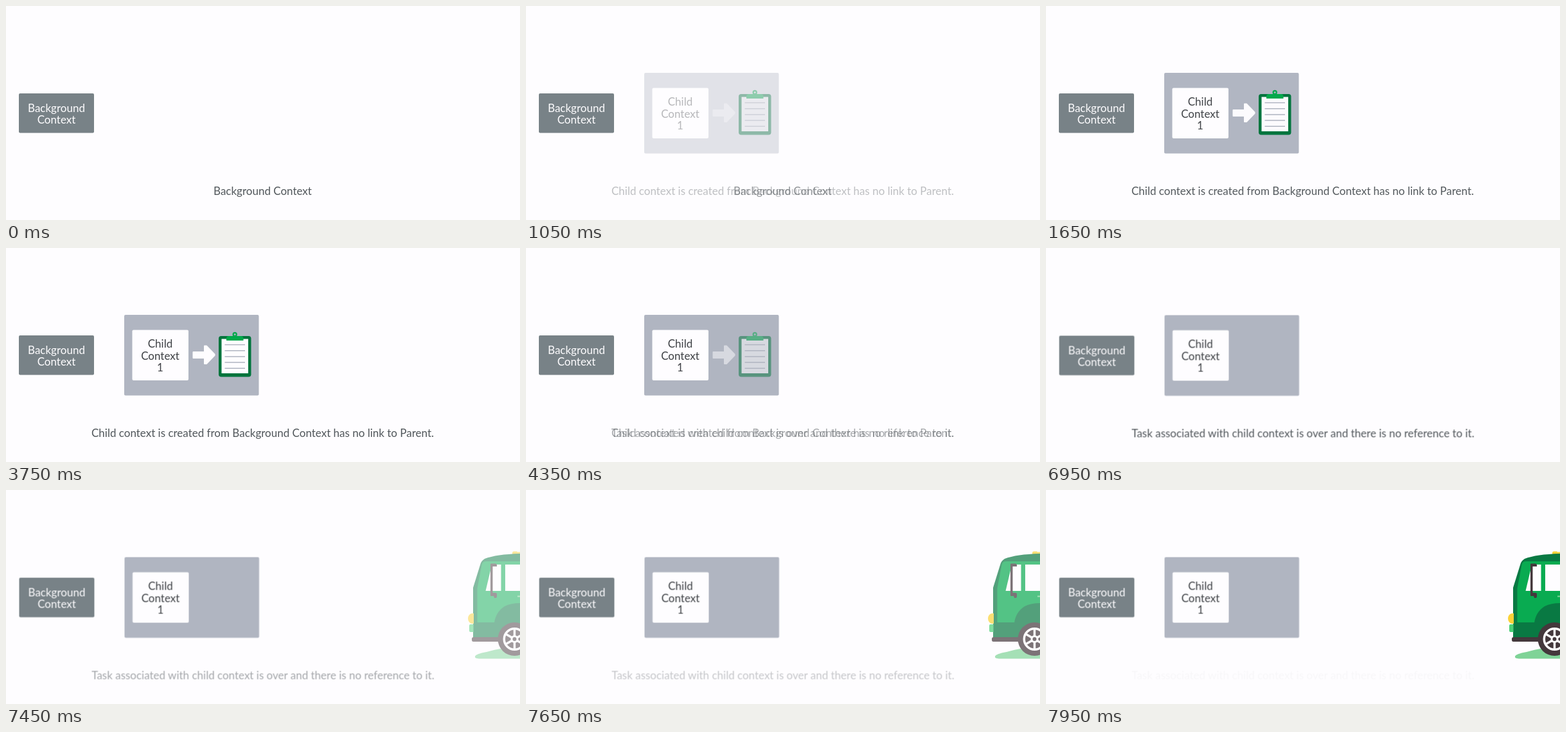
These frames come from a looping animation (800 px wide and 333 px high, 8000 ms). An HTML page:

```html
<!DOCTYPE html>
<html lang="en">
<head>
<meta charset="utf-8">
<title>Child context lifecycle</title>
<style>
  html, body { margin: 0; width: 100%; height: 100%; overflow: hidden; background: #fefdff; }
  svg { display: block; width: 100vw; height: 100vh; }
  text { font: 17px Lato, "Open Sans", sans-serif; text-anchor: middle; }
  .caption { fill: #50565a; }
  .label { fill: #3d4044; }
  .paper { fill: #fefdff; }
  .leaf { fill: #00a84a; }
  .pine { fill: #00743c; }
  .coal { fill: #3d3135; }
  .sun { fill: #fbd130; }
</style>
</head>
<body>
<svg viewBox="0 0 800 333">
  <g id="slide">
    <rect x="20" y="136" width="117" height="61.5" rx="2" fill="#788287"/>
    <g class="paper">
      <text x="78.5" y="164.5">Background</text>
      <text x="78.5" y="183">Context</text>
    </g>

    <g id="child">
      <rect x="184" y="104" width="209.5" height="125.5" rx="2" fill="#b0b5c1"/>
      <rect class="paper" x="196.5" y="127.5" width="87.5" height="78.5" rx="2"/>
      <g class="label">
        <text x="240" y="155">Child</text>
        <text x="240" y="173.5">Context</text>
        <text x="240" y="192">1</text>
      </g>
    </g>

    <g id="task">
      <path class="paper" stroke="#fefdff" stroke-width="2" stroke-linejoin="round"
        d="M291.5 162H309V152.5H312L324.5 165.5V167L312 180H309V171H291.5Z"/>
      <rect class="pine" x="331" y="137" width="50.5" height="63.5" rx="4"/>
      <rect class="paper" x="335.5" y="141.5" width="41.5" height="53.5"/>
      <path class="leaf" d="M343 144V141Q343 137 347 137H365.500Q369.500 137 369.500 141V144Z"/>
      <circle cx="356.200" cy="134.500" r="2.600" fill="none" stroke="#00a84a" stroke-width="2.200"/>
      <path d="M340.500 150.500h31.500m-31.500 9.200h31.500m-31.500 9.200h31.500m-31.500 9.200h31.500m-31.500 9.200h31.500"
        stroke="#b0b5c1" stroke-width="1.500"/>
    </g>

    <g class="caption">
      <text id="intro" x="399.5" y="293.500">Background Context</text>
      <text id="created" x="399.5" y="293.500">Child context is created from Background Context has no link to Parent.</text>
      <text id="over" x="399.5" y="293.500">Task associated with child context is over and there is no reference to it.</text>
    </g>
  </g>

  <g id="van">
    <path fill="#7ad293" d="M730 259Q731 255 748 252Q762 248 770 247H800V262.500H736Q729 262 730 259Z"/>
    <path class="sun" d="M788 101V98Q788 95.500 790.500 95.500H795.500V96.500H800V101Z"/>
    <path class="pine" d="M800 99Q763 100 745 107Q740 110 738.500 115L727 152V231H800Z"/>
    <path class="leaf" d="M800 111H747Q742 111 740.500 116L733.500 153V206H800Z"/>
    <path class="pine" d="M760 207Q762 190 776 181Q786 176 800 176V230H760Z"/>
    <path class="paper" d="M746.500 157L755.500 119Q756 116 759 116H770.500V157ZM777 116H800V157H777Z"/>
    <path d="M796 165.500H800" stroke="#7ad293" stroke-width="2"/>
    <path class="coal" d="M755 114.500H762Q764 114.500 764 117V119H757.500V160H762Q764 160 764 162V166Q764 168 762 168H760L759 165H755Q754 165 754 164V115.500Q754 114.500 755 114.500Z"/>
    <path class="sun" d="M728 192H726A7 8 0 0 0 726 208H728Z"/>
    <path fill="#43cf72" d="M727.500 209H723Q721 209 721 211V219Q721 221 723 221H727.500Z"/>
    <rect class="coal" x="725" y="229" width="60" height="7" rx="2.500"/>
    <circle class="coal" cx="791.500" cy="232" r="26"/>
    <g id="rim" transform="translate(791.500 232)" fill="none" stroke="#fefdff" stroke-width="3.500">
      <circle r="16.200"/>
    </g>
    <circle class="paper" cx="791.500" cy="232" r="6"/>
    <circle class="coal" cx="791.500" cy="232" r="3"/>
  </g>
</svg>
<script>
  const LOOP = 8000;
  const byId = id => document.getElementById(id);

  const spokes = document.createElementNS("http://www.w3.org/2000/svg", "path");
  spokes.setAttribute("d", Array.from({ length: 6 }, (_, i) => {
    const a = i * Math.PI / 3 + Math.PI / 6;
    return `M0 0L${16 * Math.cos(a)} ${16 * Math.sin(a)}`;
  }).join(""));
  byId("rim").append(spokes);

  // Each dissolve: [start, end] in ms
  const toCreated = [690, 1670];
  const toOver = [3850, 4850];
  const toVan = [6950, 7990];

  function play(id, frames) {
    const animation = byId(id).animate(frames, { duration: LOOP, iterations: Infinity });
    animation.startTime = 0 + document.timeline.currentTime;
  }

  // Fades between 0 and 1 at each given dissolve, in turn.
  function fade(id, level, ...dissolves) {
    const frames = [{ offset: 0, opacity: level }];
    for (const [start, end] of dissolves) {
      frames.push({ offset: start / LOOP, opacity: level });
      level = 1 - level;
      frames.push({ offset: end / LOOP, opacity: level });
    }
    frames.push({ offset: 1, opacity: level });
    play(id, frames);
  }

  fade("intro", 1, toCreated);
  fade("created", 0, toCreated, toOver);
  fade("over", 0, toOver, toVan);
  fade("child", 0, toCreated);
  fade("task", 0, toCreated, toOver);
  fade("van", 0, toVan);

  // The slide settles half a pixel away as the van arrives.
  const rest = "translate(0px, 0px)", nudged = "translate(0.5px, 0.5px)";
  const nudgeAt = toVan[0] / LOOP;
  play("slide", [
    { offset: 0, transform: rest },
    { offset: nudgeAt, transform: rest },
    { offset: nudgeAt, transform: nudged },
    { offset: 1, transform: nudged }
  ]);
</script>
</body>
</html>
```
